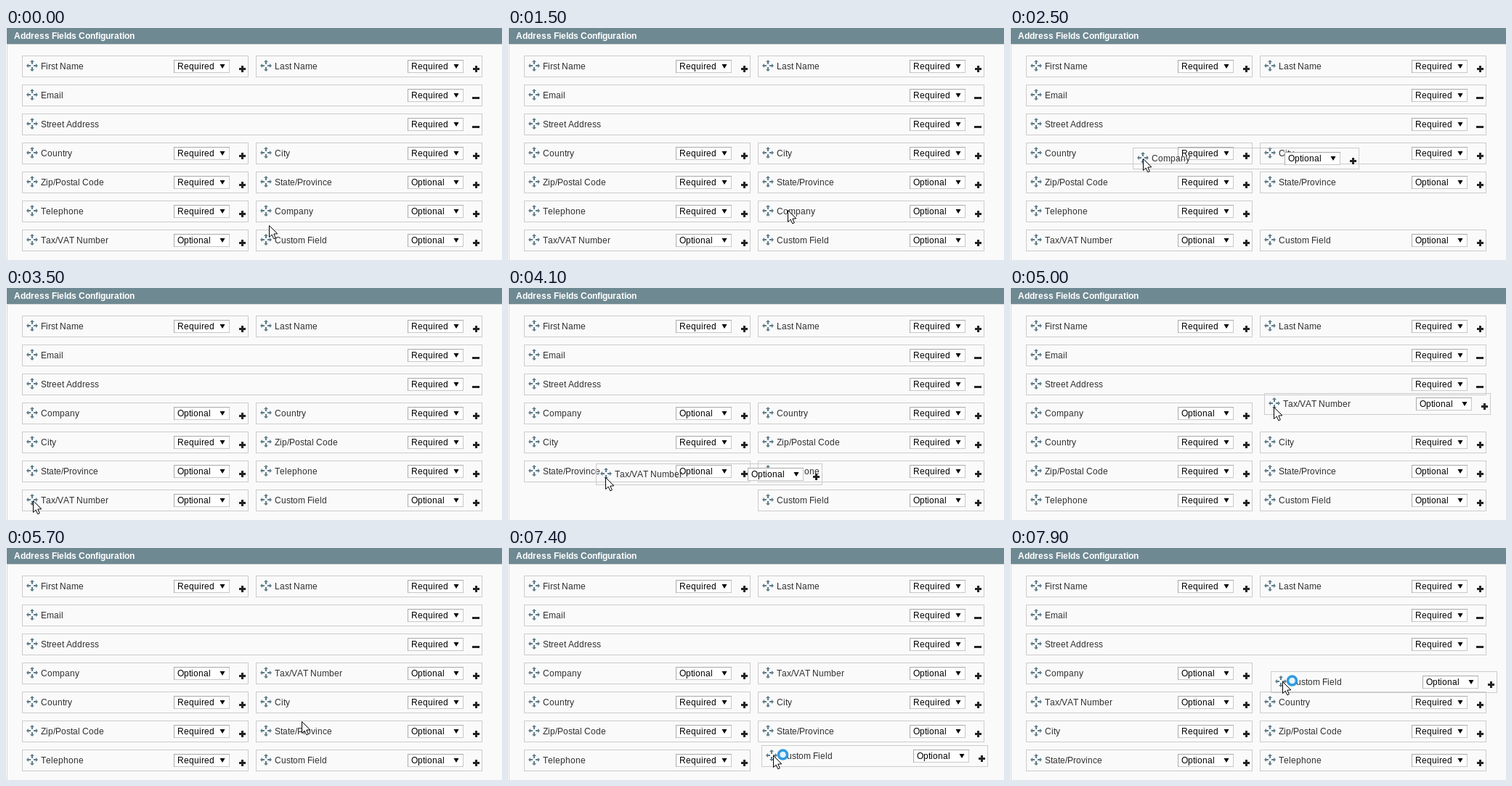
Write an HTML page with a canvas that moves like this. It is 683x320 px and loops after 8 s.

```html
<!DOCTYPE html>
<html lang="en">
<head>
<meta charset="utf-8">
<title>Address Fields Configuration</title>
<style>
html, body { margin: 0; width: 100%; height: 100%; overflow: hidden; background: #fff; }
canvas { display: block; }
</style>
</head>
<body>
<canvas id="stage" width="683" height="320"></canvas>
<script>
const ctx = document.getElementById('stage').getContext('2d');
const LOOP = 8000, STEP = 100, BUSY_FROM = 6800;
const FONT = '12px Arial, "Liberation Sans", sans-serif';
const LEFT = 22, TOP = 38, COLUMN = 322, ROW = 40;
const FIELDS = ['Country', 'City', 'Zip/Postal Code', 'State/Province',
  'Telephone', 'Company', 'Tax/VAT Number', 'Custom Field'];
const OPTIONAL = FIELDS.slice(5).concat('State/Province');

// A held field takes the next of its slots at swapAt and then after each pause.
const DRAGS = [
  { name: 'Company', start: 2000, end: 3000, grip: [14, 15], slots: [0], swapAt: 2600, pause: 100 },
  { name: 'Tax/VAT Number', start: 3900, end: 5500, grip: [13, 19], slots: [3, 1], swapAt: 4300, pause: 600 },
  { name: 'Custom Field', start: 7400, end: LOOP, grip: [16, 14], slots: [5, 3, 1], swapAt: 7600, pause: 100 }
];

// Pointer way: time, x, y; the points where a field is gripped follow from its slot.
const way = [
  [0, 362, 272], [200, 236, 284], [600, 399, 252], [1100, 440, 246], [1700, 358, 253],
  [2500, 183, 180], [2900, 131, 163], [3500, 37, 293],
  [4500, 265, 213], [5000, 363, 164], [5400, 353, 169], [5700, 407, 239],
  [6300, 352, 285], [7400, 365, 286], [7700, 387, 230], [7900, 375, 184]
];
for (const { name, start, grip } of DRAGS) {
  const [x, y] = slotPlace(FIELDS.indexOf(name));
  way.push([start - STEP, x + grip[0], y + grip[1]]);
}
way.sort((a, b) => a[0] - b[0]);

function slotPlace(i) {
  return [LEFT + COLUMN * (i % 2), TOP + ROW * (3 + (i >> 1))];
}

function pointerAt(t) {
  const i = Math.max(1, way.findIndex(k => k[0] >= t));
  const [t0, ...a] = way[i - 1], [t1, ...b] = way[i];
  const p = (t - t0) / (t1 - t0);
  return a.map((v, n) => Math.round(v + (b[n] - v) * p));
}

function orderAt(t) {
  const order = FIELDS.slice();
  for (const { name, slots, swapAt, pause } of DRAGS) {
    if (t < swapAt) break;
    const slot = slots[Math.min(slots.length - 1, Math.floor((t - swapAt) / pause))];
    order.splice(order.indexOf(name), 1);
    order.splice(slot, 0, name);
  }
  return order;
}

function rect(x, y, w, h, color) {
  ctx.fillStyle = color;
  ctx.fillRect(x, y, w, h);
}

function box(x, y, w, h, topLeft, bottomRight = topLeft) {
  rect(x, y + h - 1, w, 1, bottomRight);
  rect(x + w - 1, y, 1, h, bottomRight);
  rect(x, y, w, 1, topLeft);
  rect(x, y, 1, h, topLeft);
}

function shape(x, y, points, color) {
  ctx.beginPath();
  points.forEach(([px, py]) => ctx.lineTo(x + px, y + py));
  ctx.closePath();
  ctx.fillStyle = color;
  ctx.fill();
}

// Letters advance by whole pixels, like hinted screen text.
function text(str, x, y, color, weight = '') {
  ctx.font = weight + ' ' + FONT;
  ctx.fillStyle = color;
  for (const c of str) {
    ctx.fillText(c, x, y);
    x += Math.round(ctx.measureText(c).width);
  }
}

function moveIcon(x, y) {
  ctx.save();
  ctx.translate(x, y);
  for (let i = 0; i < 4; i++) {
    shape(0, 0, [[0, -8], [3, -5], [-3, -5]], '#5f7c89');
    rect(-1, -5, 2, 3, '#5f7c89');
    ctx.rotate(Math.PI / 2);
  }
  ctx.restore();
}

function field(name, x, y, wide) {
  const w = wide ? COLUMN + 312 : 312, right = x + w, sx = right - 103;
  box(x, y, w, 30, '#ccc');
  moveIcon(x + 14, y + 14);
  text(name, x + 26, y + 19, '#2f2f2f');
  rect(sx, y + 6, 77, 18, '#fff');
  box(sx, y + 6, 77, 18, '#aaa', '#c8c8c8');
  text(OPTIONAL.includes(name) ? 'Optional' : 'Required', sx + 5, y + 19, '#000');
  shape(sx + 67, y + 12, [[-3.5, 0], [3.5, 0], [0, 6]], '#000');
  if (wide) {
    rect(right - 14, y + 17, 10, 3, '#222');
  } else {
    rect(right - 13, y + 17, 9, 3, '#222');
    rect(right - 10, y + 14, 3, 9, '#222');
  }
}

function pointer(x, y, busy) {
  shape(x + .5, y + .5,
    [[0, 0], [0, 16], [3.7, 12.6], [6.3, 18.3], [8.8, 17.2], [6.3, 11.6], [11.3, 11.3]], '#fff');
  ctx.strokeStyle = '#000';
  ctx.lineWidth = 1;
  ctx.stroke();
  if (!busy) return;
  ctx.beginPath();
  ctx.arc(x + 13.5, y - 1, 6, 0, Math.PI * 2);
  ctx.fillStyle = '#e4f3fc';
  ctx.fill();
  ctx.strokeStyle = '#2f9be0';
  ctx.lineWidth = 3.5;
  ctx.stroke();
}

function draw(t) {
  rect(0, 0, 683, 320, '#fff');
  rect(1, 22, 682, 298, '#d6d6d6');
  rect(2, 23, 681, 297, '#fafafa');
  rect(1, 0, 682, 22, '#6f8992');
  text('Address Fields Configuration', 11, 15, '#fff', 'bold');

  field('First Name', LEFT, TOP);
  field('Last Name', LEFT + COLUMN, TOP);
  field('Email', LEFT, TOP + ROW, true);
  field('Street Address', LEFT, TOP + 2 * ROW, true);

  const held = DRAGS.find(d => t >= d.start && t < d.end);
  orderAt(t).forEach((name, i) => {
    if (!held || held.name !== name) field(name, ...slotPlace(i));
  });

  const [x, y] = pointerAt(t);
  if (held) field(held.name, x - held.grip[0], y - held.grip[1]);
  pointer(x, y, t >= BUSY_FROM);
}

const began = performance.now();
function tick() {
  const t = (performance.now() - began) % LOOP;
  draw(Math.floor(t / STEP) * STEP);
  requestAnimationFrame(tick);
}
tick();
</script>
</body>
</html>
```
